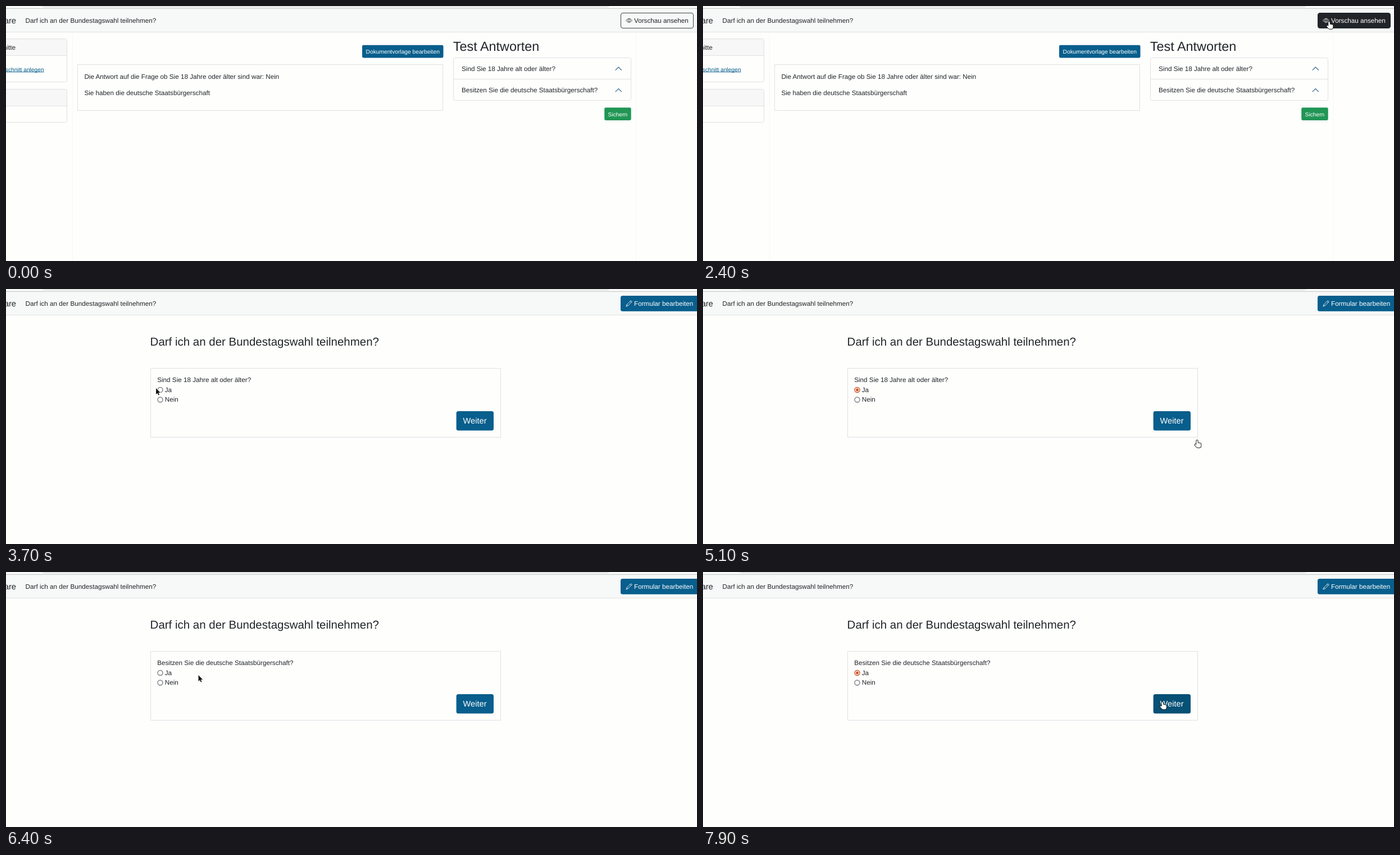
Recreate the animation shown at these times as an HTML page with a canvas. Size 1230x455 px, loop 8 s.

```html
<!DOCTYPE html>
<html lang="de">
<head>
<meta charset="utf-8">
<title>Formular-Vorschau</title>
<style>
html, body { margin: 0; width: 1230px; height: 455px; overflow: hidden; background: #fefefd; }
canvas { display: block; }
</style>
</head>
<body>
<canvas id="stage" width="1230" height="455"></canvas>
<script>
const ctx = document.getElementById('stage').getContext('2d');
const LOOP = 8000;
const INK = '#212529', BLUE = '#085e8c', BLUE_DARK = '#075076', LINE = '#e0e1e0', PAGE = '#fefefd', ORANGE = '#cf5228';
const ZOOM = 0.73125;
const BODY = 16 * ZOOM, SMALL = 14 * ZOOM, LARGE = 20 * ZOOM, H3 = 28 * ZOOM, H2 = 32 * ZOOM;
const TITLE = 'Darf ich an der Bundestagswahl teilnehmen?';
const AGE = 'Sind Sie 18 Jahre alt oder älter?';
const CITIZEN = 'Besitzen Sie die deutsche Staatsbürgerschaft?';

const EYE = new Path2D('M.6 8Q8-2 15.4 8Q8 18 .6 8z');
EYE.moveTo(10.9, 8);
EYE.arc(8, 8, 2.9, 0, Math.PI * 2);
const PENCIL = new Path2D('M12.4 .8l2.8 2.8l-9.8 9.8L.8 15.2l1.8-4.6zM10.4 2.8l2.8 2.8M2.6 10.6l2.8 2.8');
const ARROW = new Path2D('M0 0V11L2.5 8.7L4.2 12.6L6 11.8L4.3 8H7.7Z');
const HAND = new Path2D('M-1.2 7.6V1Q0-1.6 1.2 1V4.6L5 5.4Q6.8 5.1 6.8 7V9.5Q6.8 13 3.5 13H1.5Q-.5 13-4 8.4Q-4-6 7-1.2 7.6Z'.replace('Q-4-6 7-1.2 7.6Z', 'Q-4 6-1.2 7.9Z'));

// Pointer moves: start time, end time, goal
const HOME = [383, 90];
const MOVES = [
  [1500, 1700, 440, 110],
  [1700, 2200, 1114.5, 28],
  [3000, 3400, 261, 167],
  [3500, 3700, 267, 177],
  [3700, 4200, 274, 180],
  [4400, 5100, 879.5, 270],
  [5100, 5300, 818, 236],
  [6100, 6400, 342.5, 184],
  [6400, 7000, 273, 178],
  [7300, 7900, 818, 232]
];

const within = (t, from, to) => t >= from && t < to;
const clamp = v => Math.min(1, Math.max(0, v));
const ease = k => k * k * (3 - 2 * k);

function text(str, x, y, size = BODY, color = INK, align = 'left') {
  ctx.font = `${size}px "Liberation Sans", Arial, sans-serif`;
  ctx.textAlign = align;
  ctx.fillStyle = color;
  ctx.fillText(str, x, y);
}

function box(x, y, w, h, r, fill, stroke) {
  ctx.beginPath();
  ctx.roundRect(x, y, w, h, r);
  if (fill) { ctx.fillStyle = fill; ctx.fill(); }
  if (stroke) { ctx.strokeStyle = stroke; ctx.lineWidth = 1; ctx.stroke(); }
}

function rect(x, y, w, h, color) {
  ctx.fillStyle = color;
  ctx.fillRect(x, y, w, h);
}

function icon(path, color) {
  ctx.save();
  ctx.translate(1103.2, 20);
  ctx.scale(ZOOM, ZOOM);
  ctx.strokeStyle = color;
  ctx.lineWidth = 1.1;
  ctx.lineJoin = 'round';
  ctx.stroke(path);
  ctx.restore();
}

function header() {
  rect(0, 0, 1230, 46, '#f7f9f8');
  box(64.5, -12.5, 1009, 14, 3, '#fcfdfc', '#c9cbca');
  rect(0, 4, 1230, 1, '#c6c8c7');
  rect(0, 46, 1230, 1, '#e0e2e1');
  text('Formulare', 18, 31, LARGE, INK, 'right');
  text(TITLE, 34.6, 30);
}

function card(y, h) {
  box(-20.5, y, 129, h, 3, PAGE, LINE);
  box(-20, y + 0.5, 128, 29.5, [3, 3, 0, 0], '#f6f7f6');
  rect(0, y + 29.5, 108, 1, LINE);
}

function question(str, y) {
  text(str, 811, y);
  ctx.beginPath();
  ctx.moveTo(1084.7, y - 1.3);
  ctx.lineTo(1090.3, y - 6.9);
  ctx.lineTo(1095.9, y - 1.3);
  ctx.strokeStyle = '#2a6287';
  ctx.lineWidth = 1.1;
  ctx.stroke();
}

function editor(hover) {
  const label = hover ? '#fff' : INK;
  box(1094.5, 12.5, 129, 27, 3.5, hover ? INK : null, hover ? INK : '#3c4043');
  icon(EYE, label);
  text('Vorschau ansehen', 1118, 30, BODY, label);

  rect(118, 47, 1, 408, '#f5f6f5');
  rect(1121, 47, 1, 408, '#f5f6f5');

  card(58.5, 77);
  text('Abschnitte', 17, 78, BODY, INK, 'right');
  text('Abschnitt anlegen', 67.6, 117, SMALL, BLUE, 'right');
  rect(0, 117.4, 67.5, 0.9, BLUE);
  card(148.5, 59);

  box(634, 69.7, 144.5, 22.8, 2.4, BLUE);
  text('Dokumentvorlage bearbeiten', 640.6, 85, SMALL, '#fff');
  box(127.5, 104.5, 650, 82, 0, null, LINE);
  text('Die Antwort auf die Frage ob Sie 18 Jahre oder älter sind war: Nein', 139.4, 130);
  text('Sie haben die deutsche Staatsbürgerschaft', 139.4, 159);

  text('Test Antworten', 795.8, 80, H2);
  box(796.5, 92.5, 316, 76, 3, PAGE, LINE);
  rect(797, 130, 315, 1, LINE);
  question(AGE, 116);
  question(CITIZEN, 154.4);
  box(1065.2, 181.2, 47.5, 22.8, 2.4, '#219655');
  text('Sichern', 1071.6, 196.6, SMALL, '#fff');
}

function disc(y, r) {
  ctx.beginPath();
  ctx.arc(274.5, y, r, 0, Math.PI * 2);
}

function radio(label, y, checked) {
  disc(y, 4.5);
  ctx.fillStyle = '#fff';
  ctx.fill();
  ctx.strokeStyle = checked ? ORANGE : '#7f7f84';
  ctx.lineWidth = 1.4;
  ctx.stroke();
  if (checked) {
    disc(y, 2.5);
    ctx.fillStyle = ORANGE;
    ctx.fill();
  }
  text(label, 282.7, y + 3.9);
}

function preview(t) {
  box(1094, 12, 145, 27.7, 3.5, t < 3100 ? BLUE_DARK : BLUE);
  icon(PENCIL, '#fff');
  text('Formular bearbeiten', 1118, 30, BODY, '#fff');

  text(TITLE, 256.6, 101.3, H3);
  box(257.5, 141.5, 623, 123, 0, null, LINE);
  text(t < 5700 ? AGE : CITIZEN, 269.2, 166);
  radio('Ja', 180, within(t, 4500, 5700) || t >= 7200);
  radio('Nein', 197.5, false);

  if (within(t, 5500, 5900)) box(798.7, 215.1, 72.2, 40.4, 6, 'rgba(8,94,140,.45)');
  const hover = within(t, 5300, 6200) || t >= 7800;
  box(801.6, 218, 66.4, 34.6, 3.5, hover ? BLUE_DARK : BLUE);
  text('Weiter', 813.6, 240.2, LARGE, '#fff');
}

function pointer(t) {
  if (t < MOVES[0][0]) return;
  let [x, y] = HOME;
  for (const [from, to, gx, gy] of MOVES) {
    const k = ease(clamp((t - from) / (to - from)));
    x += (gx - x) * k;
    y += (gy - y) * k;
  }
  const hand = within(t, 2200, 3100) || within(t, 5000, 6200) || t >= 7800;
  const shape = hand ? HAND : ARROW;
  ctx.save();
  ctx.translate(x, y);
  ctx.lineJoin = 'round';
  ctx.strokeStyle = hand ? '#222' : '#fff';
  ctx.lineWidth = hand ? 2 : 1.6;
  ctx.fillStyle = hand ? '#fff' : '#151515';
  ctx.stroke(shape);
  ctx.fill(shape);
  ctx.restore();
}

const start = performance.now();

function frame() {
  const t = Math.floor(((performance.now() - start) % LOOP) / 100) * 100;
  ctx.textRendering = 'geometricPrecision';
  rect(0, 0, 1230, 455, PAGE);
  header();
  if (t < 2600) editor(t >= 2200);
  else preview(t);
  pointer(t);
  requestAnimationFrame(frame);
}
frame();
</script>
</body>
</html>
```
